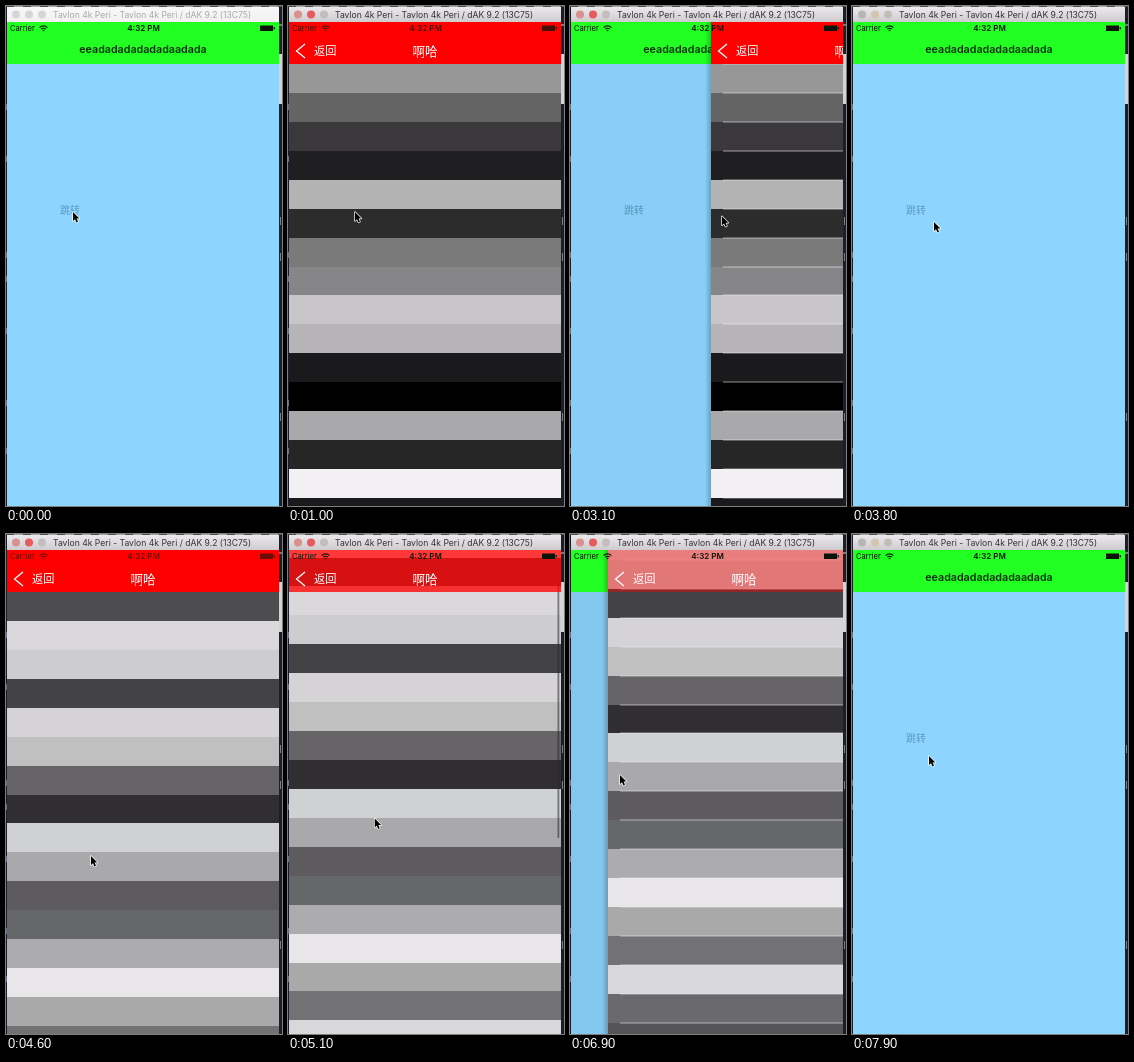
An HTML page with a canvas that plays this animation: 276 by 500 pixels, repeating every 8 s.

```html
<!DOCTYPE html>
<html lang="zh">
<head>
<meta charset="utf-8">
<style>
  html, body { margin: 0; width: 100%; height: 100%; overflow: hidden; background: #1b1d28; }
  canvas { display: block; width: 100vw; height: 100vh; }
</style>
</head>
<body>
<canvas id="stage" width="276" height="500"></canvas>
<script>
const ctx = document.getElementById('stage').getContext('2d');
const LOOP = 8000, STEP = 100;
const LEFT = 1, WIDTH = 272, TOP = 16, NAV_BOTTOM = 58, ROW = 28.93;
const LATIN = 'Inter, Roboto, sans-serif';
const CJK = '"Noto Sans CJK SC", "Noto Sans CJK", sans-serif';

const shades = text => text.split(' ').map(c => '#' + c);
const firstRows = shades('979797 646465 3b383b 1f1e20 b3b3b3 2d2c2d 7b7a7b 868587 ' +
  'c8c6c9 b6b4b7 1a191b 000000 a9a8aa 262626 f2f0f3 1a191b');
const secondRows = shades('4d4c4e dad8db cdccce 434244 d5d3d6 c0c0c0 666467 302e31 ' +
  'd0d1d2 a9a8aa 5d5b5d 666768 acabad e8e6e8 a9a9a9 727173 d8d8da 6a696b 555456 ' +
  'b9b8ba 8a898b cfced0');

// Keys are [time, value]; movement between them eases in and out or runs straight.
const smooth = u => u * u * (3 - 2 * u);
const linear = u => u;
function track(keys, t, ease = smooth) {
  if (t <= keys[0][0]) return keys[0][1];
  for (let i = 1; i < keys.length; i++) {
    const [t0, a] = keys[i - 1], [t1, b] = keys[i];
    if (t < t1) return a + (b - a) * ease((t - t0) / (t1 - t0));
  }
  return keys[keys.length - 1][1];
}

const pageX = [[600, 272], [1000, 0], [2550, 0], [3100, 140], [3400, 272],
  [4050, 272], [4450, 0], [6650, 0], [6900, 37], [7200, 140], [7550, 272]];
const scroll = [[4700, 0], [5500, 69], [6000, 125], [6400, 90]];
const cursorX = [[0, 67], [1000, 67], [1700, 60], [2400, 10], [2550, 10], [3100, 152],
  [3400, 150], [3800, 82], [4000, 68], [4200, 68], [4600, 85], [5500, 88], [6000, 88],
  [6550, 13], [6650, 13], [6900, 50], [7200, 153], [7450, 150], [7900, 77]];
const cursorY = [[0, 206], [1000, 206], [1700, 260], [2400, 204], [3400, 212],
  [3800, 216], [4000, 206], [4200, 206], [4600, 322], [4700, 322], [5500, 247],
  [6000, 190], [6550, 240], [6900, 241], [7450, 236], [7900, 222]];

function rect(color, x, y, w, h) {
  ctx.fillStyle = color;
  ctx.fillRect(x, y, w, h);
}

function label(text, x, y, size, color, { family = LATIN, weight = 400, align = 'left' } = {}) {
  ctx.font = `${weight} ${size}px ${family}`;
  ctx.textAlign = align;
  ctx.textBaseline = 'middle';
  ctx.fillStyle = color;
  ctx.fillText(text, x, y);
}

function desktop() {
  rect('#1b1d28', 0, 0, 276, 500);
  rect('#a9a3a6', 0, 0, 276, 1);
  for (let x = 0; x < 276; x += 17) rect('#514b58', x, 0, 8, 1);
  rect('#d4d4d6', 273, 48, 3, 50);
  rect('#777a80', 273, 18, 3, 2);
  for (const y of [215, 251, 411]) rect('#7c8088', 274, y - 4, 1, 8);
  for (const y of [98, 150, 246, 270, 322, 394, 442]) rect('#66707a', 0, y, 1, 6);
}

function titleBar(active, onList) {
  const shade = ctx.createLinearGradient(0, 1, 0, TOP);
  shade.addColorStop(0, active ? '#ebe9eb' : '#f8f8f8');
  shade.addColorStop(1, active ? '#cecccf' : '#f1f1f1');
  rect(shade, LEFT, 1, WIDTH, TOP - 1);
  const lights = !active ? ['#d6d6d6', '#d6d6d6', '#d6d6d6']
    : onList ? ['#d9908f', '#e85a5e', '#c4bcbd'] : ['#b9b5b2', '#d2c6ae', '#c1beb5'];
  lights.forEach((color, i) => {
    ctx.fillStyle = color;
    ctx.beginPath();
    ctx.arc(10 + 13 * i, 8.5, 4, 0, 7);
    ctx.fill();
  });
  label('Tavlon 4k Peri - Tavlon 4k Peri / dAK 9.2 (13C75)', 146, 9, 8.6,
    active ? '#343236' : '#aaa8aa', { align: 'center' });
}

function homePage(dim) {
  rect('#8dd5ff', LEFT, NAV_BOTTOM, WIDTH, 442);
  label('跳转', 54, 204, 9.9, '#5c99c4', { family: CJK });
  rect(`rgba(0,0,0,${0.075 * dim})`, LEFT, NAV_BOTTOM, WIDTH, 442);
  rect('#22ff22', LEFT, TOP, WIDTH, NAV_BOTTOM - TOP);
  label('eeadadadadadadaadada', 137, 44, 10.7, '#063006', { weight: 600, align: 'center' });
}

function listPage(x, rows, offset, showBar) {
  ctx.save();
  ctx.translate(x, 0);
  if (x > 0) {
    const shadow = ctx.createLinearGradient(-5, 0, LEFT, 0);
    shadow.addColorStop(0, 'rgba(0,0,0,0)');
    shadow.addColorStop(1, 'rgba(0,0,0,.22)');
    rect(shadow, -5, TOP, 6, 484);
  }
  rect('#fff', LEFT, TOP, WIDTH, 484);
  rows.forEach((color, i) => {
    const y = Math.round(NAV_BOTTOM + i * ROW - offset);
    rect(color, LEFT, y, WIDTH, ROW + 1);
    if (x > 0) rect('rgba(235,235,238,.6)', 13, y - 0.5, WIDTH, 1);
  });
  if (showBar) rect('rgba(40,40,40,.55)', 269.5, 30 + offset * 0.55, 1.8, 255);

  rect(`rgba(255,0,0,${1 - offset / 155})`, LEFT, TOP, WIDTH, NAV_BOTTOM - TOP);
  ctx.strokeStyle = '#fff';
  ctx.lineWidth = 1.3;
  ctx.beginPath();
  ctx.moveTo(17, 38);
  ctx.lineTo(8.5, 45);
  ctx.lineTo(17, 52);
  ctx.stroke();
  label('返回', 26, 45, 11.2, '#fff', { family: CJK });
  label('啊哈', 137, 45, 12.6, '#fff', { family: CJK, align: 'center' });
  ctx.restore();
}

function statusBar(alpha) {
  ctx.globalAlpha = alpha;
  const ink = '#0a1408';
  label('Carrier', 4, 23, 7.6, ink);
  label('4:32 PM', 137.5, 23, 8, ink, { weight: 600, align: 'center' });
  ctx.strokeStyle = ink;
  ctx.lineWidth = 1.1;
  for (const r of [1, 3.3, 5.6]) {
    ctx.beginPath();
    ctx.arc(37.5, 25.5, r, -Math.PI * 0.75, -Math.PI * 0.25);
    ctx.stroke();
  }
  rect(ink, 254, 19.5, 13, 5.5);
  rect(ink, 267.6, 21, 1.2, 2.5);
  ctx.globalAlpha = 1;
}

function cursor(x, y) {
  ctx.save();
  ctx.translate(x, y);
  const arrow = new Path2D('M0 0V9L2 7.2L3.5 10.4L5 9.7L3.6 6.6H6.4Z');
  ctx.lineJoin = 'round';
  ctx.strokeStyle = '#fff';
  ctx.lineWidth = 1.4;
  ctx.stroke(arrow);
  ctx.fillStyle = '#000';
  ctx.fill(arrow);
  ctx.restore();
}

function draw(t) {
  const x = track(pageX, t), offset = track(scroll, t, linear);
  const second = t >= 3700, onList = x < WIDTH;
  desktop();
  ctx.save();
  ctx.beginPath();
  ctx.rect(LEFT, TOP, WIDTH, 484);
  ctx.clip();
  homePage(onList ? 1 - x / WIDTH : 0);
  if (onList) {
    listPage(x, second ? secondRows : firstRows, second ? offset : 0, t > 4700 && t < 6500);
  }
  const covered = onList && x === 0 && offset === 0;
  statusBar(covered ? (second ? 0.6 : 0.75) : 1);
  ctx.restore();
  titleBar(t >= 100, onList);
  cursor(track(cursorX, t), track(cursorY, t));
}

const start = performance.now();
function frame() {
  const t = (performance.now() - start) % LOOP;
  draw(Math.floor(t / STEP) * STEP);
  requestAnimationFrame(frame);
}
frame();
</script>
</body>
</html>
```
